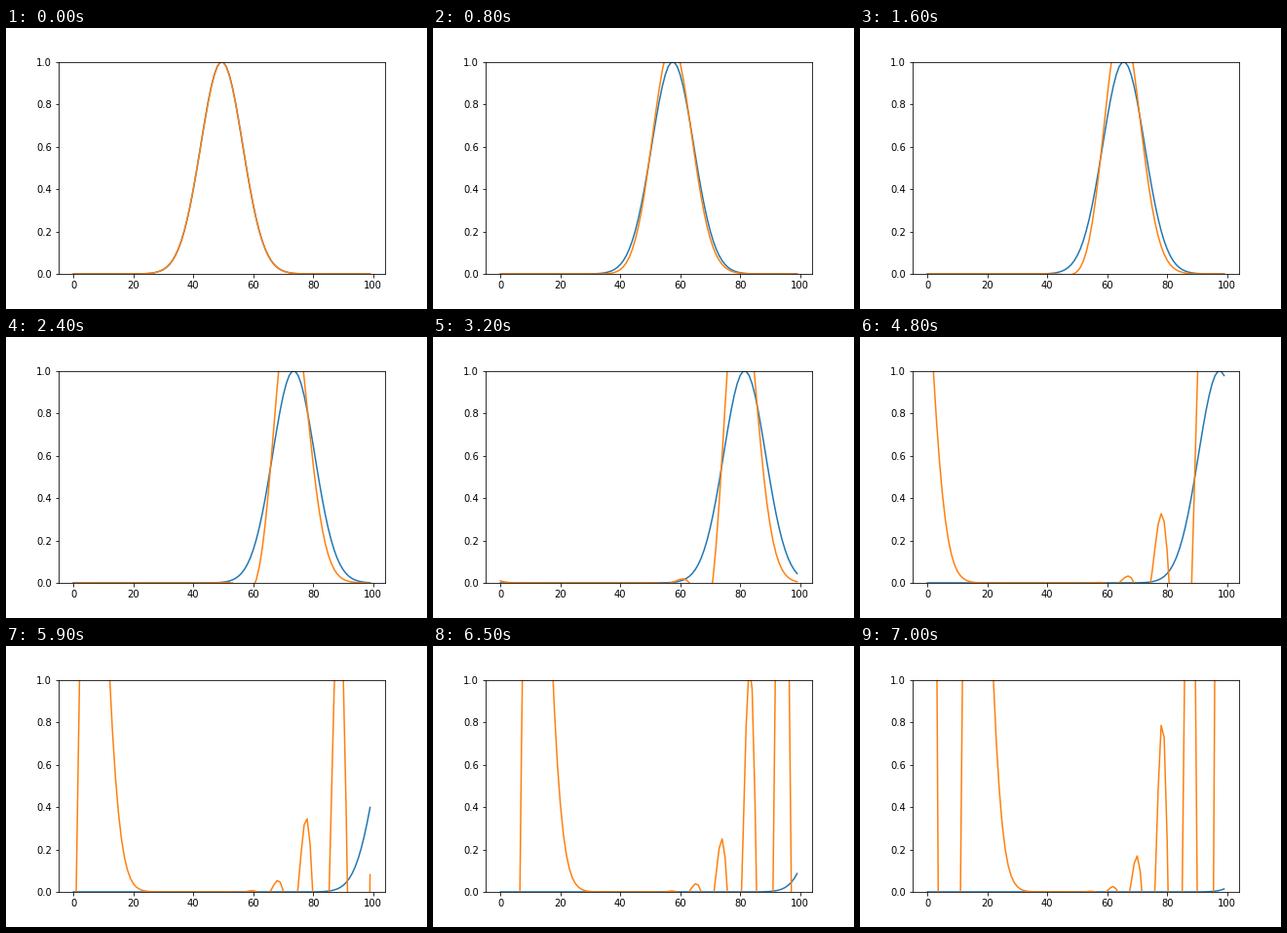
These frames come from a looping animation (432 by 288 pixels, 7.1 s). A matplotlib script:

```python
import matplotlib.pyplot as plt
import numpy as np
from matplotlib.animation import FuncAnimation

N = 100          # grid points, the first and last are ghost cells
STEPS = 71
COURANT = 1.0
cells = np.arange(N)
dx = 1 / (N - 1)


def pulse(step):
    """Exact solution: a Gaussian travelling one cell per step."""
    return np.exp(-(((cells - step) * dx - 0.5) / 0.1) ** 2)


def advance(u):
    """Forward-time centred-space advection with periodic ghost cells."""
    new = u.copy()
    new[1:-1] = u[1:-1] - COURANT / 2 * (u[2:] - u[:-2])
    new[0], new[-1] = new[-2], new[1]
    return new


numeric = [pulse(0)]
for _ in range(STEPS - 1):
    numeric.append(advance(numeric[-1]))

fig, ax = plt.subplots(figsize=(6, 4), dpi=72)
fig.subplots_adjust(bottom=0.125)
exact_line, = ax.plot(cells, pulse(0), color="tab:blue")
numeric_line, = ax.plot(cells, numeric[0], color="tab:orange")
ax.set_ylim(0, 1)


def draw(step):
    exact_line.set_ydata(pulse(step))
    numeric_line.set_ydata(numeric[step])
    return exact_line, numeric_line


anim = FuncAnimation(fig, draw, frames=STEPS, interval=100, repeat=True,
                     repeat_delay=0)
plt.show()
```
